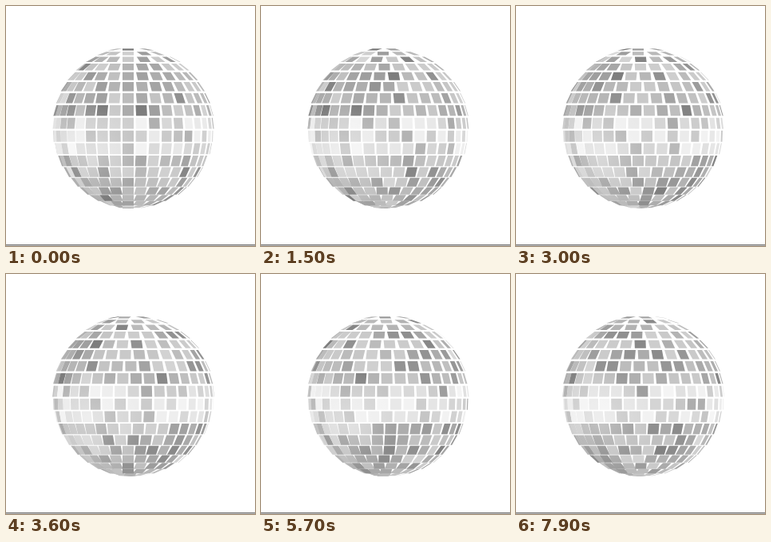
These frames come from a looping animation (312x300 px, 8000 ms). An HTML page with a canvas:

```html
<!DOCTYPE html>
<html lang="en">
<head>
<meta charset="utf-8">
<title>Mirror ball</title>
<style>
  html, body { margin: 0; width: 100%; height: 100%; overflow: hidden; background: #fff; }
  canvas { display: block; }
</style>
</head>
<body>
<canvas id="stage" width="312" height="300"></canvas>
<script>
const ctx = document.getElementById('stage').getContext('2d');
const { PI, sin, cos, floor, max } = Math;
const CX = 160, CY = 152, R = 100, SIDE = 14;
const RINGS = 19.55, PITCH = 13;
const LOOP = 8, STEP = 0.1, SPIN = 2 * PI / 18;

let seed = 71;
function random() {
  seed = (seed * 16807) % 2147483647;
  return seed / 2147483647;
}

function buildTiles() {
  const tiles = [];
  for (let ring = 1; ring < RINGS; ring++) {
    const lat = 0.001 + ring * (PI - 0.001) / RINGS;
    const count = floor(2 * PI * 0.8 * R * sin(lat) / PITCH);
    const bright = lat > 1.3 && lat < 1.9;
    for (let j = 0; j < count; j++) {
      const tone = random() ** 0.6;
      tiles.push({
        lat,
        lon: PI / 2 + j * 2 * PI / count,
        gray: bright ? 150 + 95 * tone : 118 + 88 * tone,
        phase: 2 * random()
      });
    }
  }
  return tiles;
}

const tiles = buildTiles();

// Point on a flat tile: u runs around the ball, v runs down it
function point(tile, turn, u, v) {
  const a = tile.lon + turn, r = R * sin(tile.lat) + v * cos(tile.lat);
  return [
    CX + r * cos(a) - u * sin(a),
    CY - R * cos(tile.lat) + v * sin(tile.lat)
  ];
}

const facing = (tile, turn) => sin(tile.lat) * sin(tile.lon + turn);

// Each mirror glints briefly every two seconds
function shade(tile, time) {
  const glint = max(0, cos(PI * (time - tile.phase))) ** 6;
  const gray = tile.gray + (240 - tile.gray) * 0.4 * glint;
  return `rgb(${gray},${gray},${gray})`;
}

function drawTile(tile, turn, time) {
  ctx.beginPath();
  for (const [u, v] of [[0, 0], [SIDE, 0], [SIDE, SIDE], [0, SIDE]]) {
    ctx.lineTo(...point(tile, turn, u, v));
  }
  ctx.fillStyle = shade(tile, time);
  ctx.fill();
}

const glow = ctx.createRadialGradient(104, 185, 5, 104, 185, 65);
glow.addColorStop(0, 'rgba(255,255,255,.3)');
glow.addColorStop(1, 'rgba(255,255,255,0)');

function draw(now) {
  const time = floor(now / 1000 % LOOP / STEP + 1e-6) * STEP;
  const turn = time * SPIN;
  ctx.fillStyle = '#fff';
  ctx.fillRect(0, 0, 312, 300);
  tiles.filter(t => facing(t, turn) > 0)
    .sort((a, b) => facing(a, turn) - facing(b, turn))
    .forEach(t => drawTile(t, turn, time));
  ctx.fillStyle = glow;
  ctx.fillRect(39, 120, 130, 130);
  ctx.fillStyle = '#777';
  ctx.fillRect(0, 298, 312, 1.5);
}

const start = performance.now();
function tick() {
  draw(performance.now() - start);
  requestAnimationFrame(tick);
}
tick();
</script>
</body>
</html>
```
